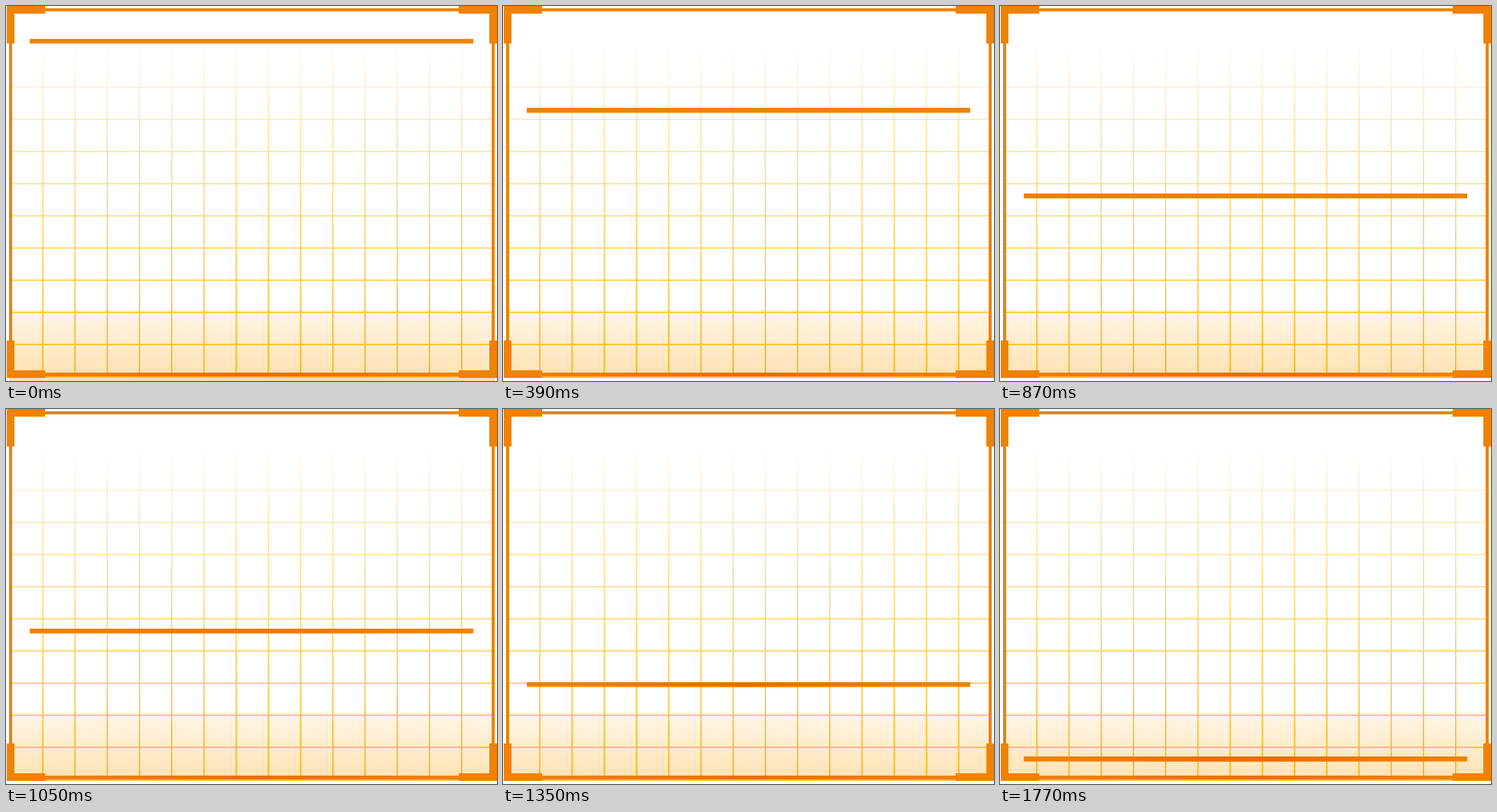
An HTML page that plays this animation: 640 px wide and 490 px high, repeating every 1800 ms.

```html
<!DOCTYPE html>
<html lang="en">
<head>
<meta charset="utf-8">
<title>Scan frame</title>
<style>
  :root { --orange: #f08200; --hot: #ec6c00; --loop: 1800ms; }
  html, body { margin: 0; width: 100%; height: 100%; overflow: hidden; background: #fff; }
  .stage { position: relative; width: 640px; height: 490px; overflow: hidden; background: #fff; }
  .stage > * { position: absolute; }

  .floor {
    left: 8px; right: 7px; top: 396px; height: 90px;
    background: linear-gradient(rgba(255, 165, 20, .1), rgba(255, 165, 20, .33));
  }
  .spill {
    left: 4px; right: 3px; top: 486px; height: 4px;
    background: rgba(255, 165, 20, .35);
    animation: spill var(--loop) step-end infinite;
  }

  .grid { left: 0; top: 0; }

  .edge {
    left: 4px; top: 3px; width: 625px; height: 472px;
    border: 4px solid var(--orange); border-bottom-width: 5px;
  }
  .base {
    left: 51px; width: 539px; top: 479px; height: 5px;
    background: linear-gradient(90deg, transparent, var(--hot), transparent);
  }
  .glow { left: 51px; width: 539px; top: 484px; height: 2px; background: rgba(255, 180, 10, .7); }

  .corner { width: 50px; height: 49px; box-sizing: border-box; border: 0 solid var(--orange); }
  .top { top: 0; border-top-width: 10px; }
  .bottom { top: 437px; border-bottom-width: 10px; }
  .left { left: 1px; border-left-width: 10px; }
  .right { left: 590px; border-right-width: 10px; }

  .bar { left: 0; top: 0; animation: scan var(--loop) steps(60) infinite; }
  .warm { animation: warm var(--loop) steps(60) infinite; }

  @keyframes scan {
    from { transform: translateY(42.6px); }
    to { transform: translateY(461.4px); }
  }
  @keyframes warm { 0%, 50% { opacity: 0; } 75%, 100% { opacity: 1; } }
  @keyframes spill { 0% { opacity: 1; } 1.667%, 100% { opacity: 0; } }
</style>
</head>
<body>
<div class="stage">
  <div class="floor"></div>
  <div class="spill"></div>
  <svg class="grid" width="640" height="490">
    <defs>
      <linearGradient id="fade" gradientUnits="userSpaceOnUse" x1="0" y1="40" x2="0" y2="484">
        <stop offset="0" stop-color="#ffb810" stop-opacity="0"/>
        <stop offset=".25" stop-color="#ffb810" stop-opacity=".35"/>
        <stop offset="1" stop-color="#f8ae00" stop-opacity=".95"/>
      </linearGradient>
      <linearGradient id="heat">
        <stop offset=".08" stop-color="#ec6c00" stop-opacity="0"/>
        <stop offset=".5" stop-color="#ec6c00"/>
        <stop offset=".92" stop-color="#ec6c00" stop-opacity="0"/>
      </linearGradient>
    </defs>
    <path id="lines" fill="url(#fade)"/>
    <g class="bar">
      <rect x="31" width="578" height="6.3" fill="#f08200"/>
      <rect class="warm" x="31" width="578" height="6.3" fill="url(#heat)"/>
    </g>
  </svg>
  <div class="edge"></div>
  <div class="base"></div>
  <div class="glow"></div>
  <div class="corner top left"></div>
  <div class="corner top right"></div>
  <div class="corner bottom left"></div>
  <div class="corner bottom right"></div>
</div>
<script>
  const cell = 42, weight = 1.6;
  const rect = (x, y, w, h) => `M${x} ${y}h${w}v${h}h${-w}z`;
  let path = "";
  for (let x = 47.2; x < 630; x += cell) path += rect(x, 58, weight, 422);
  for (let y = 105.4; y < 480; y += cell) path += rect(8, y, 625, weight);
  document.getElementById("lines").setAttribute("d", path);
</script>
</body>
</html>
```
